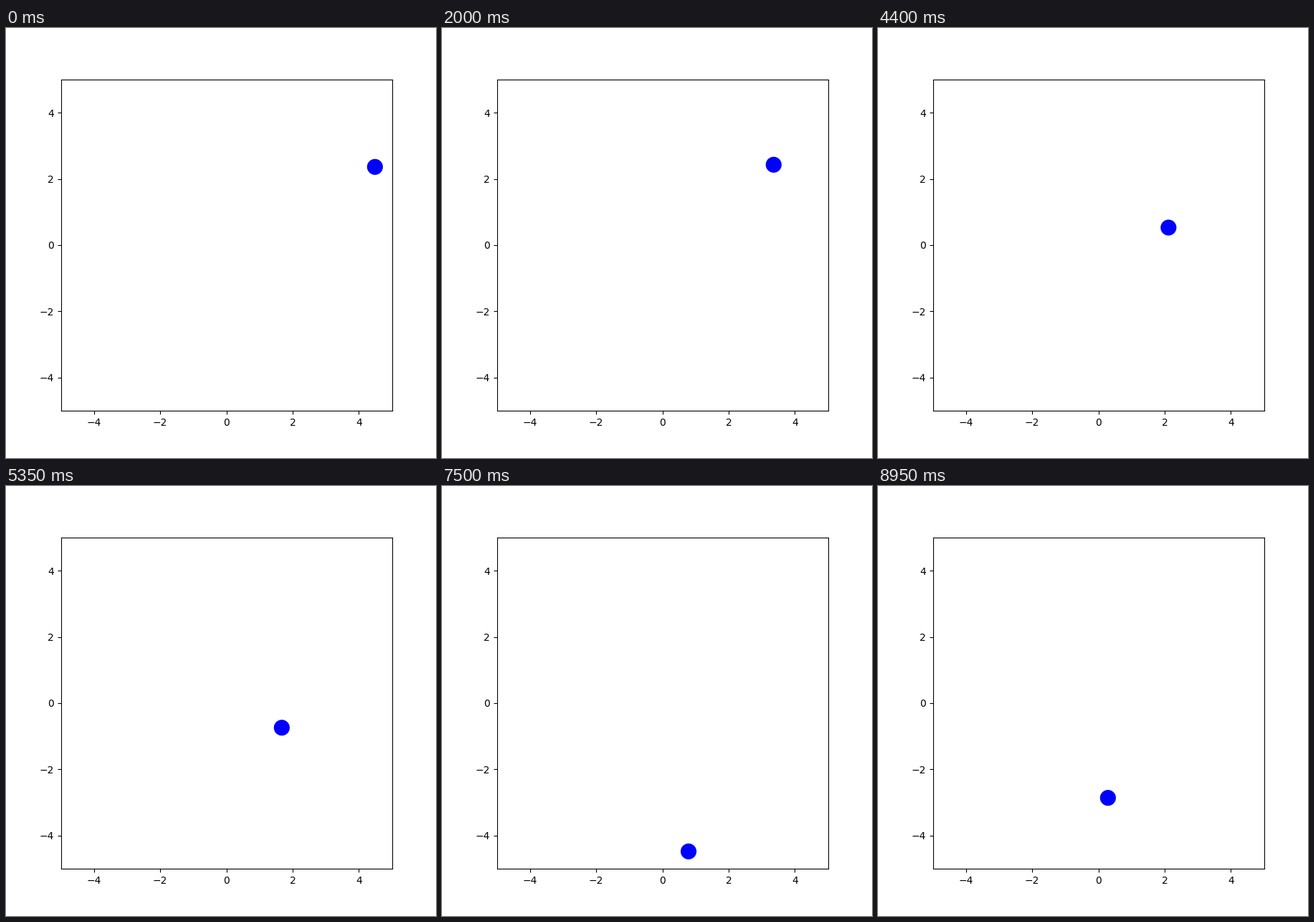
These frames come from a looping animation (600x600 px, 9000 ms). A matplotlib script:

```python
import math

import matplotlib.pyplot as plt
from matplotlib.animation import FuncAnimation
from matplotlib.patches import Circle

FRAMES = 180
INTERVAL = 50
DT = 0.01
GRAVITY = 9.8
DRAG = 0.0525
BOUNCE = 0.9
FLOOR = -4.75


def simulate(x, y, vx, vy):
    """Ball under gravity and quadratic air drag, bouncing off the floor."""
    path = [(x, y)]
    for _ in range(FRAMES - 1):
        drag = DRAG * math.hypot(vx, vy)
        new_vx = vx - drag * vx * DT
        new_vy = vy - (GRAVITY + drag * vy) * DT
        x += (vx + new_vx) / 2 * DT
        y += (vy + new_vy) / 2 * DT
        vx, vy = new_vx, new_vy
        if y < FLOOR:
            y = FLOOR
            vy *= -BOUNCE
        path.append((x, y))
    return path


path = simulate(4.488, 2.363, -2.91, 2.155)

fig, ax = plt.subplots(figsize=(6, 6), dpi=100)
ax.set_aspect("equal")
ax.set_xlim(-5, 5)
ax.set_ylim(-5, 5)
ball = ax.add_patch(Circle(path[0], 0.24, facecolor="blue", edgecolor="none", linewidth=0))


def update(frame):
    ball.center = path[frame]
    return (ball,)


anim = FuncAnimation(fig, update, frames=FRAMES, interval=INTERVAL,
                     repeat=True, repeat_delay=0)
plt.show()
```
